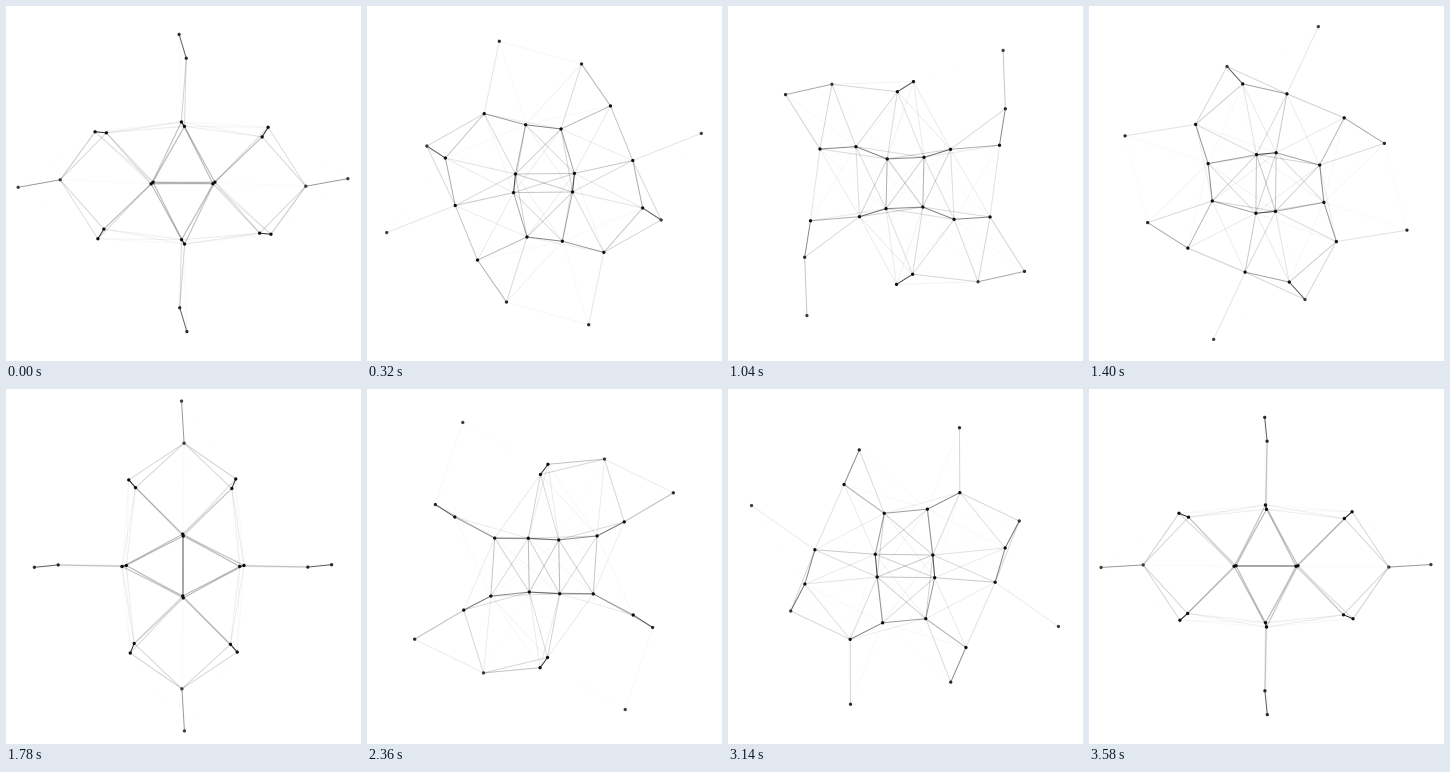
These frames come from a looping animation (355 by 355 pixels, 3600 ms). A matplotlib script:

```python
import numpy as np
import matplotlib.pyplot as plt
from matplotlib.animation import FuncAnimation
from matplotlib.collections import LineCollection

SIZE, DPI = 355, 100
PX = 72 / DPI
FRAMES, INTERVAL = 180, 20
PHI = (1 + 5 ** 0.5) / 2
CENTER = 177
CAMERA = 2.395    # viewer distance, in half edges of the outer solid
SCALE = 53.5      # pixels per unit at depth zero
REACH = 97        # points closer than this on screen are joined
FADE = 1.6        # how quickly links pale with length
START = 1.5       # degrees


def icosahedron():
    pts = []
    for a in (-1, 1):
        for b in (-PHI, PHI):
            pts += [(b, a, 0), (a, 0, b), (0, b, a)]
    return np.array(pts)


def spin(pts, degrees):
    """Rotate about the viewing axis and project with perspective."""
    t = np.radians(degrees)
    x, y, z = pts.T
    k = SCALE * CAMERA / (CAMERA - z)
    flat = np.column_stack([x * np.cos(t) - y * np.sin(t),
                            x * np.sin(t) + y * np.cos(t)])
    return CENTER + flat * k[:, None]


OUTER = icosahedron()
INNER = 0.9 * OUTER
FIRST, SECOND = np.triu_indices(2 * len(OUTER), 1)

fig = plt.figure(figsize=(SIZE / DPI, SIZE / DPI), dpi=DPI, facecolor="white")
ax = fig.add_axes([0, 0, 1, 1])
ax.set(xlim=(0, SIZE), ylim=(SIZE, 0))
ax.axis("off")

links = LineCollection([], linewidths=PX, zorder=1)
links.set_snap(False)
ax.add_collection(links, autolim=False)

# the dots nearest the viewer are a little paler
depth = np.concatenate([OUTER[:, 2], INNER[:, 2]])
shades = [str(0.05 + 0.12 * max(z, 0)) for z in depth]
dots = ax.scatter(depth, depth, s=(3.3 * PX) ** 2, c=shades, linewidths=0, zorder=2)


def draw(frame):
    angle = frame + START
    pts = np.vstack([spin(OUTER, -angle), spin(INNER, angle)])
    gap = np.linalg.norm(pts[FIRST] - pts[SECOND], axis=1)
    near = gap < REACH
    colors = np.zeros((near.sum(), 4))
    colors[:, 3] = (1 - gap[near] / REACH) ** FADE
    links.set_segments(np.stack([pts[FIRST[near]], pts[SECOND[near]]], axis=1))
    links.set_color(colors)
    dots.set_offsets(pts)
    return links, dots


anim = FuncAnimation(fig, draw, frames=FRAMES, interval=INTERVAL,
                     repeat=True, repeat_delay=0)
plt.show()
```
